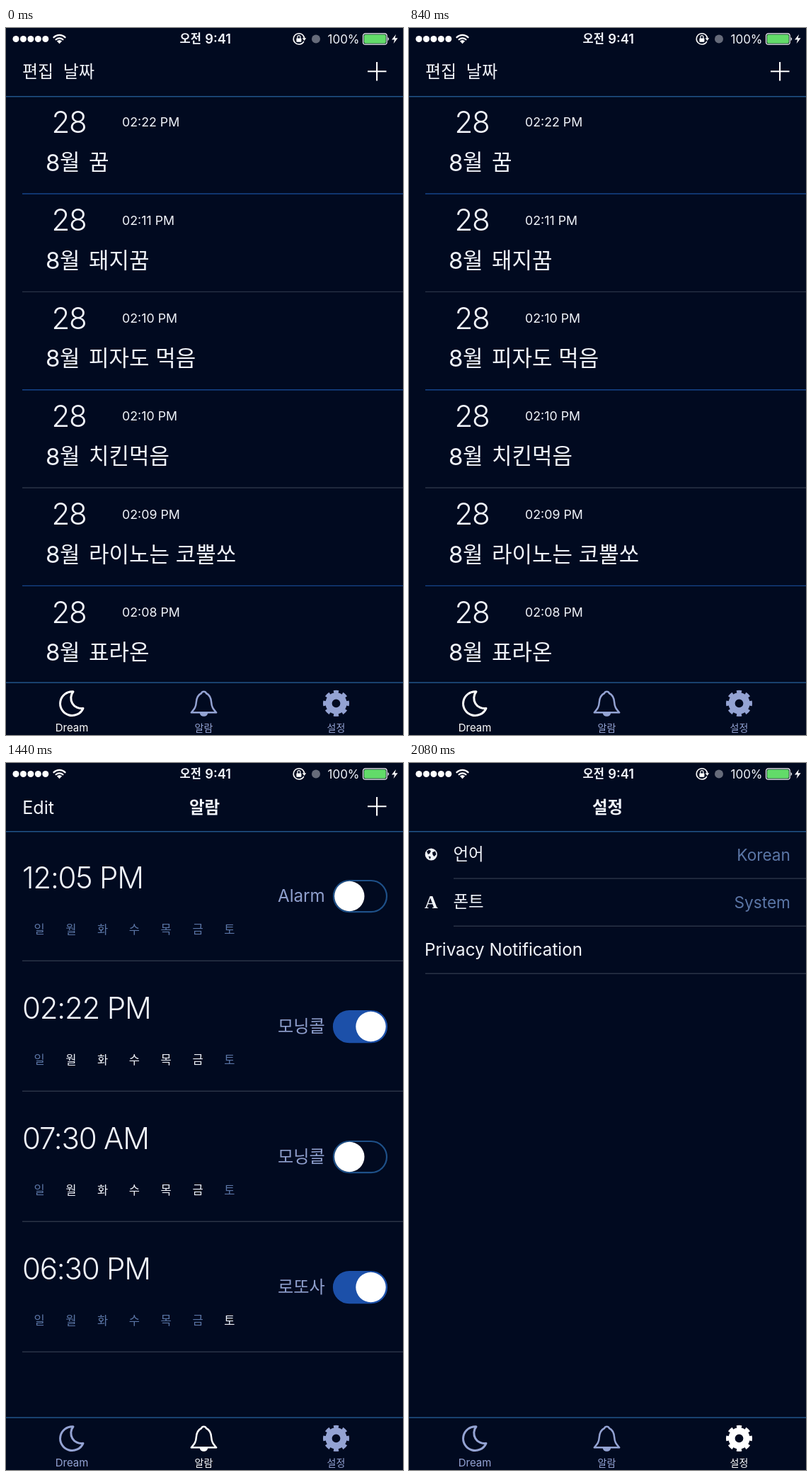
An HTML page for the animation above (2560 ms loop, 561 by 998 pixels).

```html
<!DOCTYPE html>
<html lang="ko">
<head>
<meta charset="utf-8">
<title>Dream diary</title>
<style>
html, body { margin: 0; width: 100%; height: 100%; overflow: hidden; background: #010a20; }
svg { display: block; width: 561px; height: 998px; }
text { font-family: Inter, sans-serif; fill: #f1f4fa; white-space: pre; }
.ko { font-family: "Noto Sans CJK KR", "Noto Sans CJK JP", sans-serif; }
.bold { font-weight: 600; }
.thin { font-weight: 300; letter-spacing: -1.2px; }
.dim { fill: #5b76a6; }
.label { fill: #8f9fcd; }
.mid { text-anchor: middle; }
.end { text-anchor: end; }
.serif { font-family: "Liberation Serif", serif; font-weight: 700; }
.line { fill: none; stroke: currentColor; stroke-linejoin: round; stroke-linecap: round; }
.white { color: #fff; }
.tab { color: #94a3d3; }
.tab text { fill: currentColor; }
.scr, .tab { animation: 2560ms step-end infinite; }
#dream { animation-name: first; }
#alarm { animation-name: second; }
#setup { animation-name: third; }
.tab0 { animation-name: lit0; }
.tab1 { animation-name: lit1; }
.tab2 { animation-name: lit2; }
#edit { animation: edit 2560ms step-end infinite; }
@keyframes first { 0% { opacity: 1 } 35.9375%, 100% { opacity: 0 } }
@keyframes second { 0% { opacity: 0 } 35.9375% { opacity: 1 } 60.9375%, 100% { opacity: 0 } }
@keyframes third { 0% { opacity: 0 } 60.9375%, 100% { opacity: 1 } }
@keyframes lit0 { 0% { color: #fff } 35.9375%, 100% { color: #94a3d3 } }
@keyframes lit1 { 0% { color: #94a3d3 } 35.9375% { color: #fff } 60.9375%, 100% { color: #94a3d3 } }
@keyframes lit2 { 0% { color: #94a3d3 } 60.9375%, 100% { color: #fff } }
@keyframes edit {
  0%, 35.9375% { opacity: .18 }
  37.5% { opacity: .45 }
  39.0625% { opacity: .73 }
  40.625%, 100% { opacity: 1 }
}
</style>
</head>
<body>
<svg id="stage" viewBox="0 0 561 998"></svg>
<script>
const BLUE = '#16458a', GREY = '#2a3346', EDGE = '#205489';

const text = (x, y, size, str, cls = '') =>
  `<text x="${x}" y="${y}" font-size="${size}" class="${cls}">${str}</text>`;
const rule = (x, y, color = GREY) =>
  `<path d="M${x} ${y}H561" stroke="${color}" stroke-width="1.4"/>`;
const stroke = (d, width) => `<path class="line" d="${d}" stroke-width="${width}"/>`;
const plus = `<path d="M511 61.3H537.5M524.1 48V74.6" stroke="#fff" stroke-width="2.1"/>`;

function statusBar() {
  const dots = [0, 1, 2, 3, 4].map(i =>
    `<circle cx="${14 + i * 10.45}" cy="15.5" r="4.5" fill="#fff"/>`).join('');
  return `<g class="white">${dots}
    ${stroke('M67.5 13.2A11.5 11.5 0 0 1 83.5 13.2M70.6 16.3A7 7 0 0 1 80.4 16.3', 2.3)}
    <path d="M75.5 22.2L71.9 18.6A5 5 0 0 1 79.1 18.6Z" fill="#fff"/>
    ${text(245.5, 21.3, 16.5, '오전', 'ko bold')}
    ${text(281.2, 22, 18.3, '9:41', 'bold')}
    ${stroke('M420.6 19.3A7.7 7.7 0 1 1 421.6 14.5', 1.5)}
    <path d="M418.6 14.2H424.2L421.5 18Z" fill="#fff"/>
    <rect x="410.4" y="14.4" width="7" height="5.4" rx=".8" fill="#fff"/>
    ${stroke('M411.9 14.5V12.7A2 2 0 0 1 415.9 12.7V14.5', 1.2)}
    <circle cx="438" cy="15.5" r="6" fill="#666b7a"/>
    ${text(454.5, 21.8, 17, '100%')}
    <rect x="504.6" y="7.8" width="33.6" height="15.4" rx="3.2" fill="none" stroke="#fff" stroke-width="1.2"/>
    <rect x="506" y="9.2" width="30.8" height="12.6" rx="1.8" fill="#62db69"/>
    <path d="M539.6 13A3 3 0 0 1 539.6 18.2Z" fill="#fff"/>
    <path d="M551 9L545 16.6H549L547.6 22L553.6 14.2H549.6Z" fill="#fff"/></g>`;
}

function dreamScreen() {
  const rows = [
    ['02:22', '꿈'], ['02:11', '돼지꿈'], ['02:10', '피자도 먹음'],
    ['02:10', '치킨먹음'], ['02:09', '라이노는 코뿔쏘'], ['02:08', '표라온']
  ];
  const list = rows.map(([time, title], i) => {
    const y = i * 138.35;
    return text(64.4, 148 + y, 42, '28', 'thin')
      + text(164, 139.3 + y, 17.8, time + ' PM')
      + text(56, 201.5 + y, 33, '8')
      + text(76, 200.3 + y, 31, '월', 'ko')
      + text(117, 200.3 + y, 31, title, 'ko')
      + (i < 5 ? rule(23, 234 + y, i % 2 ? GREY : BLUE) : '');
  }).join('');
  return text(23, 70.4, 24, '편집', 'ko') + text(80.8, 70.4, 24, '날짜', 'ko') + plus + list;
}

function toggle(y, on) {
  return `<rect x="463" y="${y - 22}" width="75" height="44.2" rx="22.1"
      fill="${on ? '#1c50a9' : 'none'}" stroke="${on ? '#1c50a9' : '#1e5088'}" stroke-width="2.2"/>
    <circle cx="${on ? 515.5 : 485.3}" cy="${y}" r="21.2" fill="#fff"/>`;
}

function alarmScreen() {
  const rows = [
    ['12:05 PM', 'Alarm', ''], ['02:22 PM', '모닝콜', '월화수목금', true],
    ['07:30 AM', '모닝콜', '월화수목금'], ['06:30 PM', '로또사', '토', true]
  ];
  const list = rows.map(([time, name, days, on], i) => {
    const y = i * 184;
    const week = [...'일월화수목금토'].map((d, k) =>
      text(47 + k * 44.8, 241 + y, 16.5, d, 'ko mid ' + (days.includes(d) ? '' : 'dim'))).join('');
    return text(23, 177 + y, 42, time, 'thin')
      + week
      + text(450.8, 196 + y, 24.2, name, 'label end ' + (i ? 'ko' : ''))
      + toggle(188 + y, on) + rule(23, 279.3 + y);
  }).join('');
  return `<g id="edit">${text(23.2, 72, 25.2, 'Edit')}</g>`
    + text(280.5, 70.6, 23.5, '알람', 'ko bold mid') + plus + list;
}

function setupScreen() {
  return text(280.5, 70.6, 23.5, '설정', 'ko bold mid')
    + `<circle cx="31.3" cy="129" r="8.6" fill="#f1f4fa"/>
       <path d="M25 125L28 122.5L31 124L29.5 127.5L27 129ZM33 126L37 124.5L38.5 129L35.5 132L33.5 129.5ZM27.5 131.5L31 132.5L29.5 136Z" fill="#010a20"/>`
    + text(62.5, 137, 23.5, '언어', 'ko') + text(539, 138, 22.7, 'Korean', 'dim end') + rule(63, 163)
    + text(22, 205.3, 26, 'A', 'serif')
    + text(62.5, 204.3, 23.5, '폰트', 'ko') + text(539, 205.3, 22.7, 'System', 'dim end') + rule(63, 230.2)
    + text(22, 272.3, 24.2, 'Privacy Notification') + rule(23, 297.3);
}

function tabBar() {
  const moon = stroke('M95 936.8A16.9 16.9 0 1 0 109 960.3A14.6 14.6 0 0 1 95 936.8Z', 3);
  const bell = stroke('M276.2 939A3.4 2.8 0 0 1 282.8 939C288 941.5 289.8 946 290.2 952C290.6 959.5 293.5 962 297.2 966.3H261.8C265.5 962 268.4 959.5 268.8 952C269.2 946 271 941.5 276.2 939Z', 2.5)
    + '<path d="M273.8 967A5.7 4.8 0 0 0 285.2 967Z" fill="currentColor"/>';
  const gear = `<g fill="none" stroke="currentColor">
    <circle cx="466.5" cy="953.3" r="10.5" stroke-width="9.2"/>
    <circle cx="466.5" cy="953.3" r="16.3" stroke-width="4.4" pathLength="16" stroke-dasharray="1.1 .9" stroke-dashoffset=".55"/></g>`;
  return [[moon, 93, 'Dream', 15, ''], [bell, 279.5, '알람', 14, 'ko'], [gear, 466.5, '설정', 14, 'ko']]
    .map(([icon, x, name, size, cls], i) =>
      `<g class="tab tab${i}">${icon}${text(x, 992.6, size, name, 'mid ' + cls)}</g>`).join('');
}

document.getElementById('stage').innerHTML = `
  <rect width="561" height="998" fill="#010a20"/>
  ${statusBar()}
  <g id="dream" class="scr">${dreamScreen()}</g>
  <g id="alarm" class="scr">${alarmScreen()}</g>
  <g id="setup" class="scr">${setupScreen()}</g>
  ${rule(0, 96.7, EDGE)}
  ${rule(0, 924, EDGE)}
  ${tabBar()}`;
</script>
</body>
</html>
```
